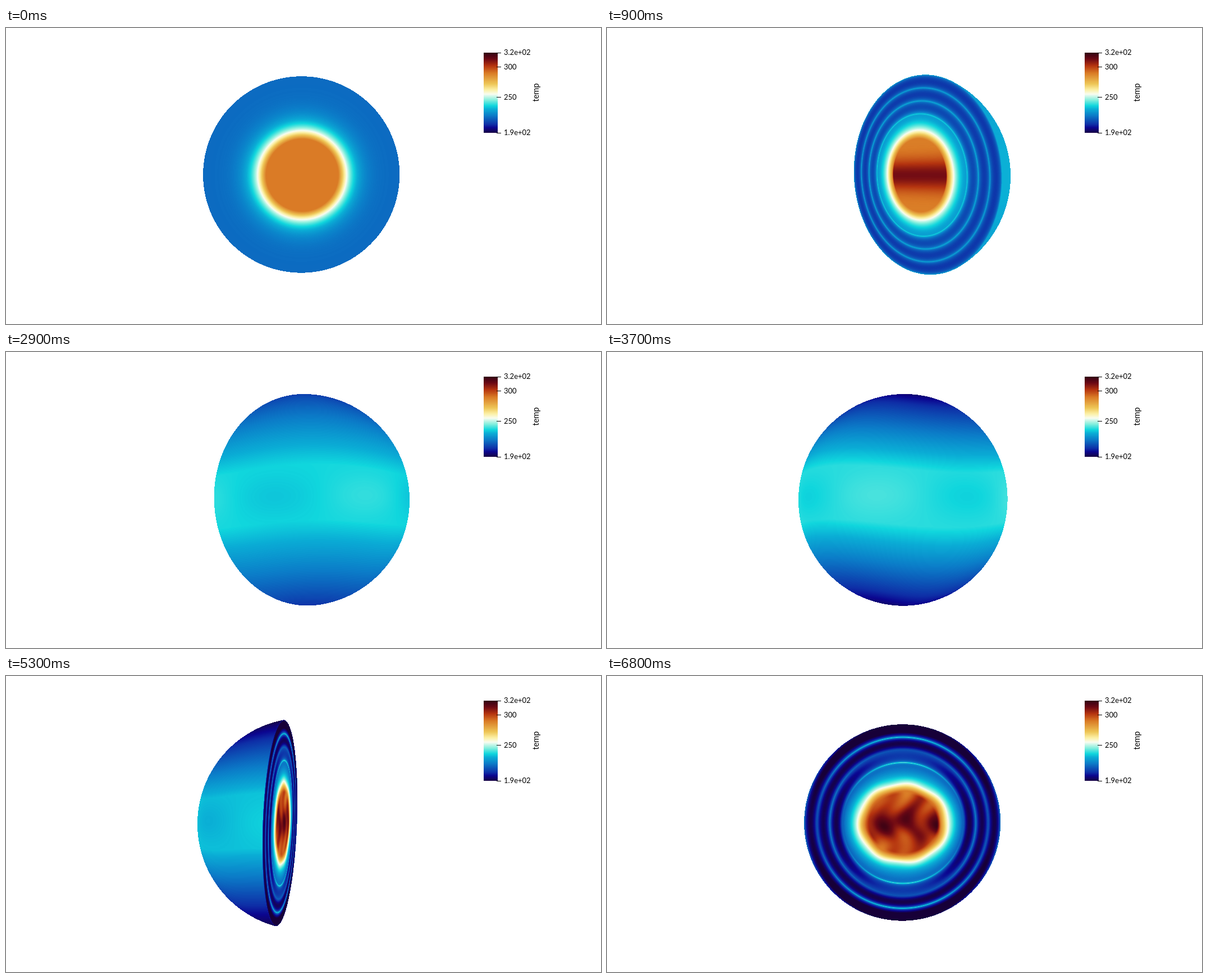
Animation, 1060 px wide and 528 px high, one loop 6.9 s. Source, as an HTML page with a canvas:

```html
<!DOCTYPE html>
<html lang="en">
<head>
<meta charset="utf-8">
<title>Rotating temperature field</title>
<style>
  html, body { margin: 0; width: 100%; height: 100%; overflow: hidden; background: #fff; }
  canvas, svg { position: absolute; left: 0; top: 0; width: 1060px; height: 528px; }
  text { font: 13px Lato, sans-serif; fill: #000; }
  .title { font-size: 14.5px; }
  path { stroke: #000; fill: none; shape-rendering: crispEdges; }
</style>
</head>
<body>
<canvas id="stage" width="1060" height="528"></canvas>
<svg viewBox="0 0 1060 528">
  <path d="M873 44.5h9M874 69.5h8M874 123.5h8M874 187.5h8"/>
  <text x="887" y="48">3.2e+02</text>
  <text x="887" y="73.5">300</text>
  <text x="887" y="127.5">250</text>
  <text x="887" y="191">1.9e+02</text>
  <text class="title" transform="translate(949 131.5) rotate(-90)">temp</text>
</svg>
<script>
const STEP = 100, FRAMES = 69;
const CX = 530, CY = 264, DIST = 985, RADIUS = 185.6, CUT = 37;
const RIM = Math.sqrt(RADIUS ** 2 - CUT ** 2);
const TILT = 2.2 * Math.PI / 180;
const BOX = { x: 339, y: 73, size: 382 };
// Radii relative to the rim of the cut face.
const CORE = .365, SHELL = .615, SPACING = .128;

// Key colours by temperature in kelvin.
const RAMP = {
  190: '#180038', 200: '#0b0690', 205: '#0e2ea6', 220: '#0b7cc8', 230: '#0aacd5',
  236: '#10d6dd', 245: '#80eedd', 255: '#f8fcf0', 262: '#fcf1a8', 272: '#eec656',
  290: '#d97a25', 302: '#b4330f', 313: '#6c0814', 325: '#280014'
};

const clamp = v => Math.max(0, Math.min(1, v));
const mix = (a, b, k) => a + (b - a) * k;
const smooth = (a, b, v) => { const k = clamp((v - a) / (b - a)); return k * k * (3 - 2 * k); };
const bell = v => Math.exp(-v * v);

const ctx = document.getElementById('stage').getContext('2d');

// Paints the ramp once on a strip and reads it back as a lookup table.
function makeShades(count) {
  const strip = document.createElement('canvas');
  strip.width = count;
  strip.height = 1;
  const pen = strip.getContext('2d');
  const gradient = pen.createLinearGradient(0, 0, count, 0);
  for (const [temp, color] of Object.entries(RAMP)) gradient.addColorStop((temp - 190) / 135, color);
  pen.fillStyle = gradient;
  pen.fillRect(0, 0, count, 1);
  const { data } = pen.getImageData(0, 0, count, 1);
  return Array.from({ length: count }, (_, n) => data.slice(n * 4, n * 4 + 4));
}
const SHADES = makeShades(1080);
const shade = temp => SHADES[Math.round(clamp((temp - 190) / 135) * (SHADES.length - 1))];

function makeField(frame) {
  const early = clamp(frame / 9) ** .7, late = clamp((frame - 9) / 51);
  const drift = (frame - 60) / 8;
  const equator = 217 + 13 * early + 8 * bell((frame - 37) / 16);
  const pole = 217 + 9 * early - 36 * smooth(8, 48, frame);
  const waves = smooth(10, 28, frame);

  function core(u, v) {
    const band = bell(v / 28);
    const calm = mix(290, mix(289 + 23 * band, 297 + 16 * band, late), early);
    const streaks = Math.sin(u / 8 + 1.6 * Math.sin(v / 15 + drift) - drift) +
      .8 * Math.sin(u / 15 - v / 12 + 2 + drift);
    return calm + late * late * 5 * streaks;
  }

  // Thin warm lines at the shell boundaries, cool troughs between them.
  function shells(rho, lat) {
    const pos = (rho - SHELL) / SPACING, ring = Math.round(pos);
    if (pos < -.5) return 0;
    const off = Math.abs(pos - ring) * 2;
    const trough = Math.sin(off * Math.PI / 2) * smooth(-.2, .2, pos);
    const depth = mix(10 * early, pos < 1 ? 20 * (1 - .7 * lat) : 20, late);
    const glow = ring % 2 ? 8 * (1 - lat) : 28 * lat;
    return mix(12 * early, glow, late) * Math.exp(-off / .13) - depth * trough;
  }

  function face(u, v) {
    let rho = Math.hypot(u, v) / RIM;
    const lat = rho ? (v / RIM / rho) ** 2 : 0;
    rho += late * .007 * bell((rho - .42) / .06) * Math.sin(7 * Math.atan2(v, u) + drift);
    const x = rho * (1 + late * mix(-.035, .12, lat)) - CORE;
    const floor = 216.5 - late * (5 + 8 * (1 - lat) * bell((rho - .62) / .09) +
      20 * lat * smooth(.9, .97, rho));
    const outer = floor + (290 - floor) * Math.exp(-((Math.max(0, x) / .128) ** 1.2)) +
      shells(rho, lat);
    return x > .012 ? outer : mix(core(u, v), outer, smooth(-.005 - .03 * late, .012, x));
  }

  function surface(a, y, depth) {
    const lon = Math.atan2(a, -depth);
    const s = Math.abs(y + waves * .03 * Math.cos(3 * (lon + .6)));
    return mix(pole, equator, clamp((.97 - s) / .75)) +
      waves * 2.5 * Math.cos(4.2 * lon) * bell(y / .18);
  }
  return { face, surface };
}

const image = ctx.createImageData(BOX.size, BOX.size);

function render(frame) {
  const turn = (-3.3 + frame * 360 / 68) * Math.PI / 180;
  const sin = Math.sin(turn), cos = Math.cos(turn);
  const st = Math.sin(TILT), ct = Math.cos(TILT);
  const nx = -sin * ct, ny = -st, nz = cos * ct;
  const ux = -sin * st, uy = ct, uz = cos * st;
  const field = makeField(frame), data = image.data;
  const D2 = DIST * DIST;
  data.fill(255);

  for (let row = 0; row < BOX.size; row++) {
    const py = CY - (BOX.y + row + .5);
    for (let col = 0; col < BOX.size; col++) {
      const px = BOX.x + col + .5 - CX;
      const q = px * px + py * py + D2;
      const disc = D2 * D2 - q * (D2 - RADIUS * RADIUS);
      if (disc < 0) continue;
      const root = Math.sqrt(disc), near = (D2 - root) / q, far = (D2 + root) / q;
      let k = near, x = px * k, y = py * k, z = DIST * (1 - k);
      const depth = x * nx + y * ny + z * nz;
      let temp;
      if (depth <= -CUT) {
        temp = field.surface((x * cos + z * sin) / RADIUS,
          (x * ux + y * uy + z * uz) / RADIUS, depth / RADIUS);
      } else {
        k = (-CUT - DIST * nz) / (px * nx + py * ny - DIST * nz);
        if (!(k > near && k < far)) continue;
        x = px * k; y = py * k; z = DIST * (1 - k);
        temp = field.face(x * cos + z * sin, x * ux + y * uy + z * uz);
      }
      data.set(shade(temp), (row * BOX.size + col) * 4);
    }
  }
  ctx.putImageData(image, BOX.x, BOX.y);
}

function drawBar() {
  for (let y = 44; y < 187; y++) {
    const [r, g, b] = shade(250 + (123 - y) / 1.08);
    ctx.fillStyle = `rgb(${r}, ${g}, ${b})`;
    ctx.fillRect(851, y, 25, 1);
  }
}

let shown = -1;
function tick() {
  const frame = Math.floor(performance.now() / STEP) % FRAMES;
  if (frame !== shown) render(shown = frame);
  requestAnimationFrame(tick);
}
drawBar();
tick();
</script>
</body>
</html>
```
